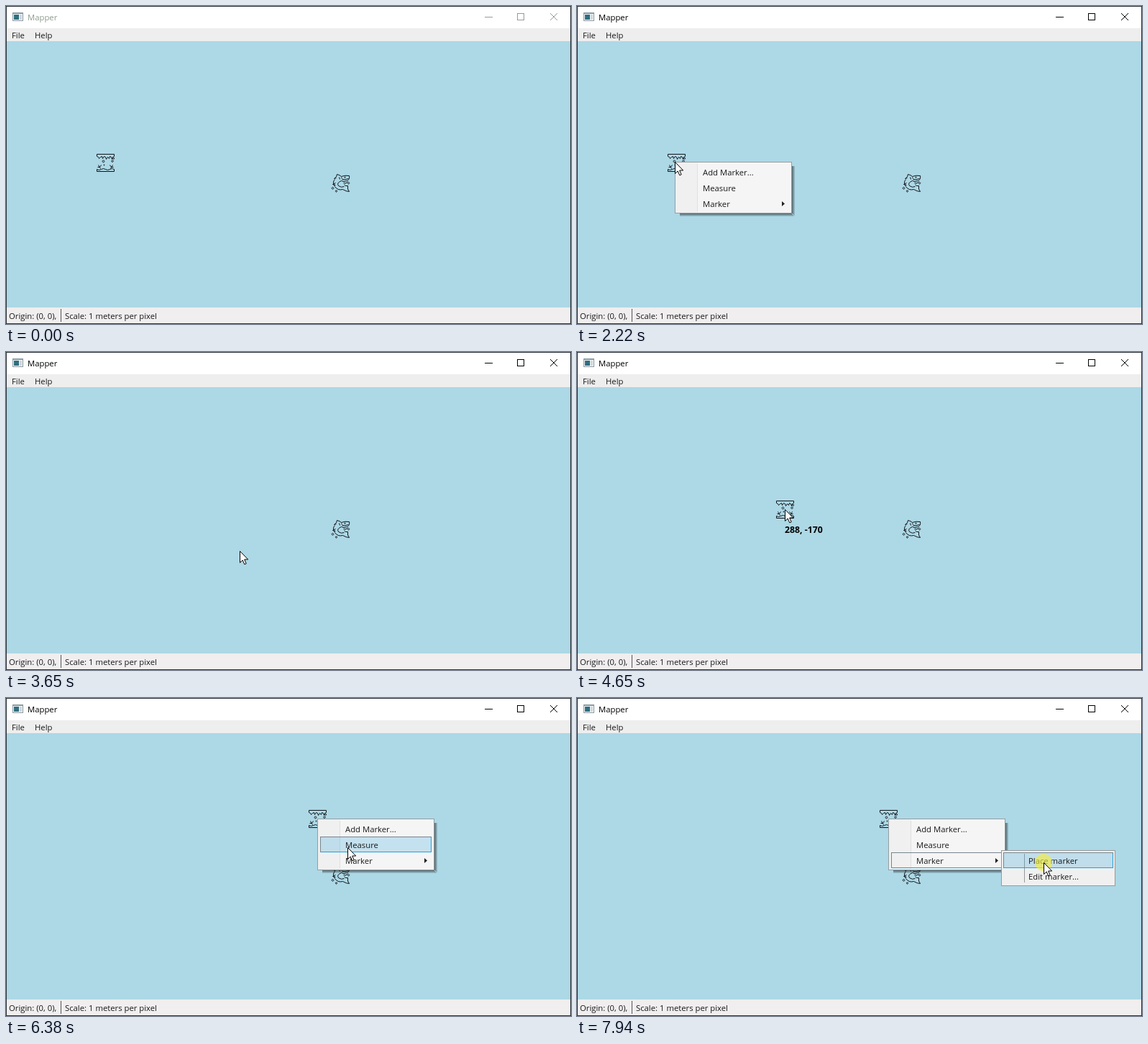
Animation of 786x443 px, one loop 8000 ms. Source, as an HTML page with a canvas:

```html
<!DOCTYPE html>
<html lang="en">
<head>
<meta charset="utf-8">
<title>Mapper</title>
<style>
  html, body { margin: 0; height: 100%; overflow: hidden; }
  canvas { display: block; }
</style>
</head>
<body>
<canvas id="stage" width="786" height="443"></canvas>
<script>
const ctx = document.getElementById('stage').getContext('2d');
const LOOP = 8000;
const FONT = '11.3px "Open Sans", "Noto Sans", sans-serif';
const LABEL_FONT = 'bold 12.3px "Open Sans", "Noto Sans", sans-serif';
const BLUE = '#26a0da';

const cave = new Path2D(`M-12-9V-12H12V-9M-12-9L-10-8-9-6-7-8-5-9-4-6-2-9 0-8 1-5 3-8 5-6 6-9 8-8 9-5 10-8 12-9
  M-12 12H12V9Q9 7 6 9T0 9T-6 9T-12 9V12M-7 8L-10 3M-8 6H-11M-8 6L-6 3M7 8L10 3M8 6H11M8 6L6 3
  M-3-3.5a1.4 1.4 0 1 0 .01 0M11-7a1 1 0 1 0 .01 0M9.5-3.5a1.2 1.2 0 1 0 .01 0M-2 2.5a.5 .5 0 1 0 .01 0`);
const shark = new Path2D(`M-9-6Q-5-8-5-12Q-1-11 1-9Q6-11 12-10Q13-5 9-3Q4-1 1-3M11-6Q6-4 2-5
  M-9-6L-6-7M-8-5Q-12-1-8 5Q-4 11 3 9Q8 12 12 12Q9 9 10 4Q6 5 5 2M1-3Q-6 0-3 4Q1 7 5 5M-7 0L-11 2L-7 3
  M-2-8L-1-5M1-8L2-6M6-8.5a.6 .6 0 1 0 .01 0M4 0Q8 2 10-2
  M-11 6a1.3 1.3 0 1 0 .01 0M-6 10.5a1 1 0 1 0 .01 0M11-1a1.2 1.2 0 1 0 .01 0`);
const arrow = new Path2D('M.5.5V16.5L4.2 13L6.8 18.8L9.2 17.8L6.7 12H11.7Z');

// Pointer positions: time, x, y
const pointerPath = [
  [280, 719, 430], [460, 480, 345], [590, 325, 312], [640, 323, 311],
  [820, 323, 311], [900, 364, 327], [1250, 160, 215], [1400, 105, 190], [1560, 136, 217],
  [2220, 136, 217], [2400, 175, 240], [2620, 250, 270], [2990, 284, 276],
  [3040, 284, 276], [3350, 325, 277],
  [4240, 325, 277], [4450, 304, 250], [4650, 289, 219], [4760, 281, 200], [4900, 310, 182], [5030, 348, 180],
  [5210, 348, 180], [5540, 433, 168],
  [6100, 433, 168], [6350, 470, 205], [6600, 510, 228], [6870, 515, 230],
  [6920, 515, 230], [7020, 502, 232], [7400, 600, 230], [7660, 649, 236],
  [7760, 649, 236], [7850, 649, 229]
];
const clicks = [[1790, 1890], [3500, 3650], [5720, 5825], [7850, LOOP]];
const menus = [
  { x: 136, y: 217, open: 1895, close: 3650, sub: 2880, action: 'Move marker', edge: BLUE },
  { x: 433, y: 168, open: 5825, close: LOOP, sub: 6780, action: 'Place marker', edge: '#76868e' }
];

const clamp = v => Math.max(0, Math.min(1, v));

function pointerAt(t) {
  const i = pointerPath.findIndex(key => key[0] > t);
  if (i < 0) return pointerPath.at(-1).slice(1);
  const [t0, x0, y0] = pointerPath[i - 1], [t1, x1, y1] = pointerPath[i];
  const k = (t - t0) / (t1 - t0);
  return [Math.round(x0 + (x1 - x0) * k), Math.round(y0 + (y1 - y0) * k)];
}

function rect(x, y, w, h, color) {
  ctx.fillStyle = color;
  ctx.fillRect(x, y, w, h);
}

function frame(x, y, w, h, color) {
  ctx.strokeStyle = color;
  ctx.strokeRect(x + .5, y + .5, w - 1, h - 1);
}

function text(str, x, y, color = '#1a1a1a', font = FONT) {
  ctx.font = font;
  ctx.fillStyle = color;
  ctx.fillText(str, x, y);
}

function icon(path, x, y) {
  ctx.save();
  ctx.translate(x + .5, y + .5);
  ctx.strokeStyle = '#101418';
  ctx.stroke(path);
  ctx.restore();
}

function drawWindow(active) {
  rect(0, 0, 786, 443, '#add8e6');
  rect(0, 0, 786, 31, '#fff');
  rect(0, 31, 786, 18, '#eee');
  rect(0, 420, 786, 23, '#f0eeee');
  frame(0, 0, 786, 443, '#2a3238');

  rect(9, 9, 15, 12, '#8c9aa2');
  rect(10, 11, 13, 9, '#f2f5f6');
  rect(11, 12, 7, 7, '#2f6f80');
  rect(19, 12, 3, 7, '#cfd6da');

  const ink = active ? '#000' : '#999';
  text('Mapper', 30, 20, active ? '#000' : '#8f9a8f');
  rect(666, 15, 11, 1, ink);
  frame(711, 10, 10, 10, ink);
  ctx.beginPath();
  ctx.moveTo(757, 10); ctx.lineTo(767, 20);
  ctx.moveTo(767, 10); ctx.lineTo(757, 20);
  ctx.stroke();

  text('File', 8, 45);
  text('Help', 40, 45);
  text('Origin: (0, 0),', 4, 436);
  rect(76, 422, 1, 18, '#555');
  text('Scale: 1 meters per pixel', 82, 436);
}

function highlight(x, y, w, edge, filled) {
  if (filled) rect(x, y, w, 22, 'rgba(38,160,218,.24)');
  frame(x, y, w, 22, BLUE);
  rect(x, y, w, 1, edge);
  rect(x, y, 1, 22, edge);
}

function rowUnder(py, top, count) {
  const row = Math.floor((py - top - 3) / 22);
  return row >= 0 && row < count ? row : -1;
}

function drawMenu(menu, t, px, py) {
  const { x, y, edge } = menu, subX = x + 157, subY = y + 44;
  const subAlpha = clamp((t - menu.sub) / 100);
  const inSub = subAlpha > 0 && px > subX;

  ctx.globalAlpha = clamp((t - menu.open) / 125);
  for (let i = 0; i < 4; i++) {
    const shade = `rgba(0,0,0,${.48 - i * .11})`;
    rect(x + 163 + i, y + 6, 1, 66 + i, shade);
    rect(x + 7, y + 72 + i, 156 + i, 1, shade);
  }
  rect(x, y, 163, 72, '#f5f5f5');
  rect(x + 1, y + 1, 31, 70, '#f0f0f0');
  rect(x + 31, y + 3, 1, 66, '#e0e0e0');
  frame(x, y, 163, 72, '#979da0');

  const row = subAlpha > 0 ? 2 : rowUnder(py, y, 3);
  if (row >= 0) highlight(x + 4, y + 3 + row * 22, 155, edge, row < 2);
  ['Add Marker...', 'Measure', 'Marker'].forEach((item, i) => text(item, x + 39, y + 19 + i * 22));
  ctx.fillStyle = '#212121';
  ctx.beginPath();
  ctx.moveTo(x + 149, y + 55);
  ctx.lineTo(x + 153, y + 58.5);
  ctx.lineTo(x + 149, y + 62);
  ctx.fill();

  ctx.globalAlpha = subAlpha;
  rect(subX, subY, 161 - (x > 400 ? 2 : 0), 50, '#f0f0f0');
  frame(subX, subY, 161 - (x > 400 ? 2 : 0), 50, '#999');
  rect(subX + 32, subY + 5, 1, 40, '#999');
  const subRow = inSub ? rowUnder(py, subY, 2) : -1;
  if (subRow >= 0) highlight(subX + 3, subY + 3 + subRow * 22, 153, edge, true);
  text(menu.action, subX + 38, subY + 19);
  text('Edit marker...', subX + 38, subY + 41);
  ctx.globalAlpha = 1;
}

function drawPointer(t, x, y) {
  if (clicks.some(([from, to]) => t >= from && t < to)) {
    ctx.fillStyle = 'rgba(244,236,60,.65)';
    ctx.beginPath();
    ctx.arc(x, y, 12, 0, 7);
    ctx.fill();
  }
  ctx.save();
  ctx.translate(x, y);
  ctx.fillStyle = '#fff';
  ctx.fill(arrow);
  ctx.strokeStyle = '#000';
  ctx.stroke(arrow);
  ctx.restore();
}

function draw(t) {
  const visible = t >= 280;
  const [px, py] = visible ? pointerAt(t) : [0, 0];
  drawWindow(t >= 1790);
  icon(shark, 465, 246);
  if (t < 3650) icon(cave, 138, 218);
  else if (t >= 4010) {
    const [x, y] = pointerAt(Math.min(t, 5540));
    icon(cave, x, y);
    if (t < 5800) text(`${x - 1}, ${49 - y}`, x, y + 33, '#000', LABEL_FONT);
  }
  for (const menu of menus)
    if (t > menu.open && t < menu.close) drawMenu(menu, t, px, py);
  if (visible) drawPointer(t, px, py);
}

function tick() {
  draw(performance.now() % LOOP);
  requestAnimationFrame(tick);
}
tick();
</script>
</body>
</html>
```
